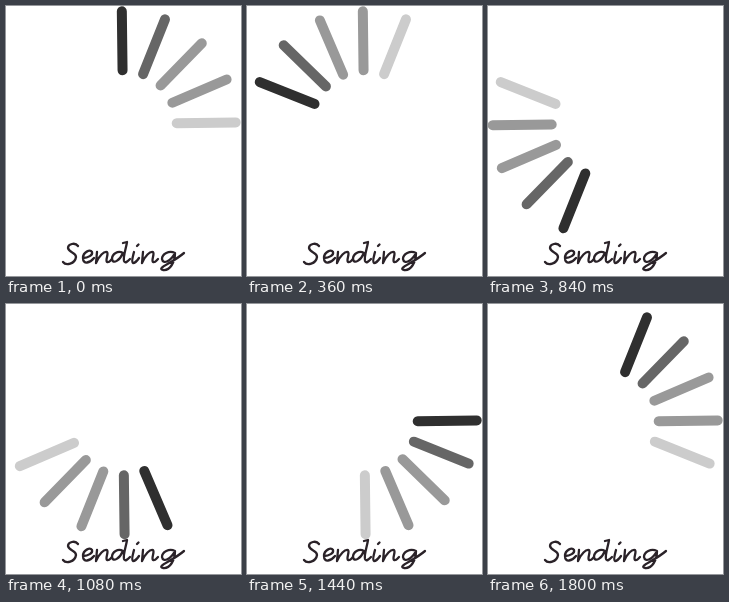
Write an HTML page that moves like this. It is 235 px wide and 270 px high and loops after 1.92 s.

```html
<!DOCTYPE html>
<html lang="en">
<head>
<meta charset="utf-8">
<title>Sending</title>
<style>
  html, body { margin: 0; width: 100%; height: 100%; overflow: hidden; background: #fff; }
  svg { display: block; width: 235px; height: 270px; }
  #spokes { stroke-width: 10; stroke-linecap: round; }
  #word { fill: none; stroke: #2a2228; stroke-width: 2.3; stroke-linecap: round; stroke-linejoin: round; }
</style>
</head>
<body>
<svg viewBox="0 0 235 270">
  <g id="spokes"></g>
  <!-- handwritten lettering, one path per letter -->
  <g id="word" role="img" aria-label="Sending">
    <path d="M72 240C69 236 62 238 62 242C63 247 70 246 70 251C69 258 60 260 57 256"/>
    <path d="M77 252C82 252 87 249 86 246C84 243 77 246 77 252C77 259 84 257 88 252"/>
    <path id="n" d="M91 246L90 257C93 250 98 245 101 246C103 248 99 254 101 256C103 257 104 255 106 253"/>
    <path d="M117 247C112 244 106 248 106 253C107 259 114 254 117 247M117 237L121 236C120 243 117 250 118 255C119 258 122 255 124 253"/>
    <path d="M128 246C127 250 125 256 127 257C129 257 131 255 133 252M131 240l1.500-1.500"/>
    <use href="#n" x="46"/>
    <path d="M169 247C163 244 156 248 156 253C157 259 165 255 169 247C169 256 164 265 157 264C150 262 165 258 178 247"/>
  </g>
</svg>
<script>
  const STEP = 120, COUNT = 16, TILT = -0.7;
  const shades = ['#2f2f2f', '#666', '#999', '#999', '#ccc'];
  const group = document.getElementById('spokes');

  const spokes = shades.map(shade => {
    const line = document.createElementNS('http://www.w3.org/2000/svg', 'line');
    const attrs = { x1: 53.5, x2: 112.5, y1: 0, y2: 0, stroke: shade };
    for (const key in attrs) line.setAttribute(key, attrs[key]);
    group.prepend(line);
    return line;
  });

  // The dark head jumps one spoke anticlockwise per step; lighter spokes trail it.
  function draw(now) {
    const step = Math.floor(now / STEP) % COUNT;
    spokes.forEach((line, i) => {
      const angle = TILT - 90 - (step - i) * 360 / COUNT;
      line.setAttribute('transform', `translate(117.2 117.8) rotate(${angle})`);
    });
  }

  const start = performance.now();
  function tick() {
    draw(performance.now() - start);
    requestAnimationFrame(tick);
  }
  tick();
</script>
</body>
</html>
```
